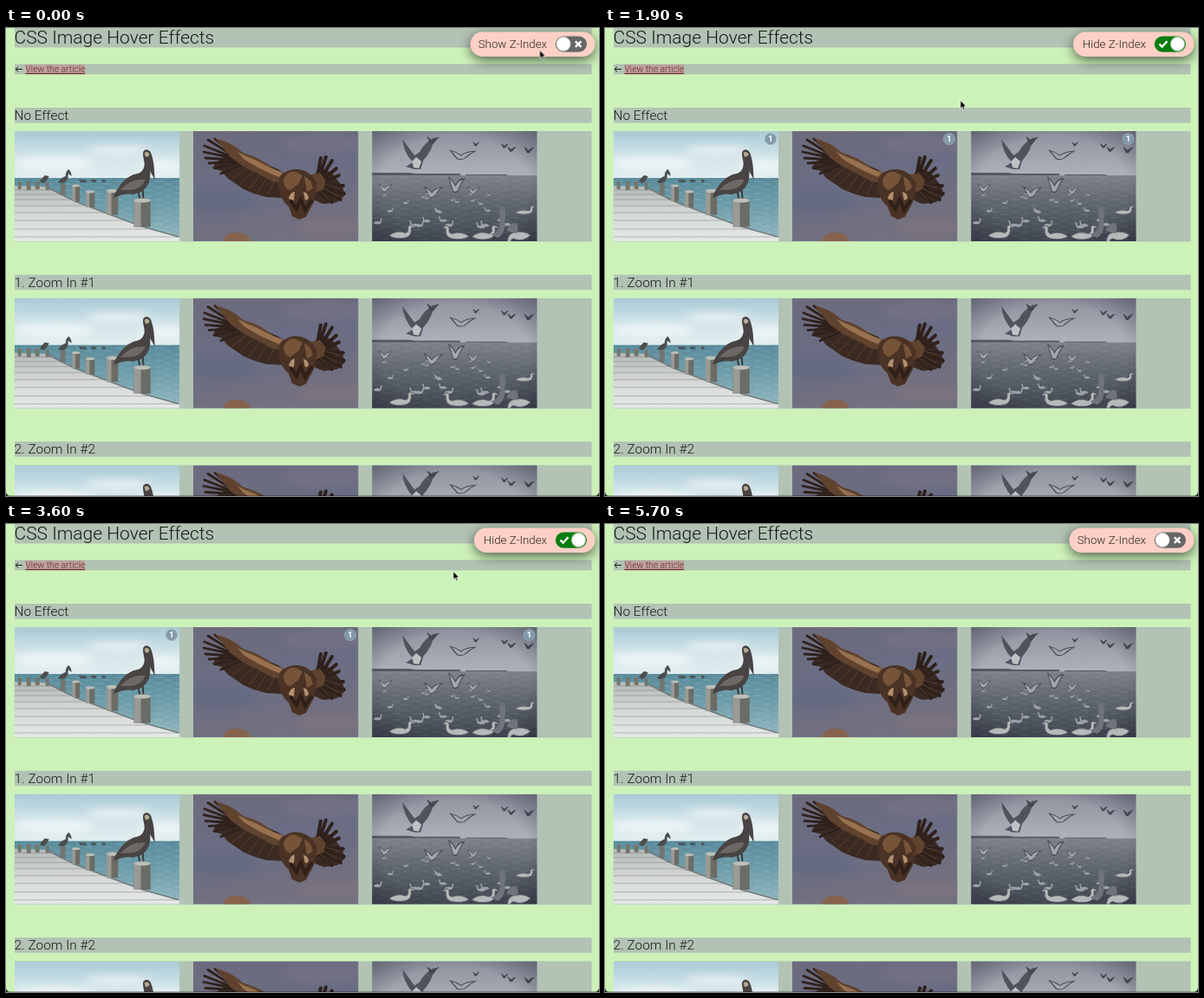
An HTML page that plays this animation: 684 by 540 pixels, repeating every 5.8 s.

```html
<!DOCTYPE html>
<html lang="en">
<head>
<meta charset="utf-8">
<title>CSS Image Hover Effects</title>
<style>
  html, body { margin: 0; width: 100%; height: 100%; overflow: hidden; background: #cdf2b9; }
  svg.stage { display: block; width: 684px; height: 540px; }
  text { font-family: Roboto, "Liberation Sans", Arial, sans-serif; font-weight: 300; fill: #161b17; }
  .title { font-size: 21px; }
  .head { font-size: 15.4px; }
  .small { font-size: 10.3px; }
  .label { font-size: 13.3px; text-anchor: end; fill: #2b2322; }
  .badge { font-size: 9.5px; font-weight: 700; text-anchor: middle; fill: #fff; }
  .panel { fill: #fdd0c5; filter: drop-shadow(0 4px 7px rgba(0, 0, 0, .6)); }

  .off, .on, .arrow, .hand, .cursor, .knob, .track, .tick, .cross { animation: 5800ms linear infinite; }
  .off { animation-name: off; animation-timing-function: step-end; }
  .on { animation-name: on; animation-timing-function: step-end; }
  .hand { animation-name: hand; animation-timing-function: step-end; }
  .arrow { animation-name: arrow; animation-timing-function: step-end; }
  .cursor { animation-name: travel; }
  .knob { animation-name: slide; }
  .track { animation-name: tint; }
  .tick { animation-name: tick; }
  .cross { animation-name: cross; }

  @keyframes off { 0%, 68.966% { opacity: 1 } 17.241% { opacity: 0 } 100% { opacity: 1 } }
  @keyframes on { 0%, 68.966% { opacity: 0 } 17.241% { opacity: 1 } 100% { opacity: 0 } }
  @keyframes hand { 0%, 23.3%, 77.5% { opacity: 0 } 11.2%, 65.5% { opacity: 1 } 100% { opacity: 0 } }
  @keyframes arrow { 0%, 23.3%, 77.5% { opacity: 1 } 11.2%, 65.5% { opacity: 0 } 100% { opacity: 1 } }
  @keyframes travel {
    0% { transform: translate(615.5px, 25.5px); animation-timing-function: ease-in-out }
    12.5%, 21% { transform: translate(640px, 23px); animation-timing-function: ease-in-out }
    32.759% { transform: translate(410px, 83.5px); animation-timing-function: ease-in-out }
    51.724%, 55% { transform: translate(274px, 119px); animation-timing-function: ease-in-out }
    67.241%, 75% { transform: translate(655.5px, 17.5px); animation-timing-function: ease-in }
    82.759%, 100% { transform: translate(700px, 44px) }
  }
  @keyframes slide {
    0%, 17.241%, 74.138%, 100% { transform: translate(643px, 18.5px) }
    22.414%, 68.966% { transform: translate(660.5px, 18.5px) }
  }
  @keyframes tint {
    0%, 17.241%, 74.138%, 100% { fill: #666 }
    22.414%, 70.69% { fill: #0b7d10 }
  }
  @keyframes tick { 0%, 17.241%, 74.138%, 100% { opacity: 0 } 22.414%, 68.966% { opacity: 1 } }
  @keyframes cross { 0%, 17.241%, 74.138%, 100% { opacity: 1 } 20%, 71% { opacity: 0 } }
</style>
</head>
<body>
<svg class="stage" viewBox="0 0 684 540">
  <defs>
    <linearGradient id="sky" x2="0" y2="1">
      <stop stop-color="#a9cad6"/><stop offset=".55" stop-color="#d3e5ea"/><stop offset="1" stop-color="#e2edef"/>
    </linearGradient>
    <linearGradient id="sea" x2="0" y2="1">
      <stop stop-color="#5a8c9b"/><stop offset=".5" stop-color="#719fac"/><stop offset="1" stop-color="#94bac1"/>
    </linearGradient>
    <linearGradient id="deck" x2="0" y2="1">
      <stop stop-color="#b4b8b6"/><stop offset=".5" stop-color="#d5d8d7"/><stop offset="1" stop-color="#e6e9e8"/>
    </linearGradient>
    <linearGradient id="hill" x2=".3" y2="1">
      <stop stop-color="#6d6b7d"/><stop offset=".5" stop-color="#6a6d84"/><stop offset="1" stop-color="#73707f"/>
    </linearGradient>
    <linearGradient id="dusk" x2="0" y2="1">
      <stop stop-color="#8f919e"/><stop offset="1" stop-color="#b0b2bb"/>
    </linearGradient>
    <linearGradient id="lake" x2="0" y2="1">
      <stop stop-color="#7d828c"/><stop offset=".4" stop-color="#626872"/><stop offset="1" stop-color="#40464f"/>
    </linearGradient>
    <radialGradient id="edge" r=".75">
      <stop offset=".6" stop-color="#222735" stop-opacity="0"/><stop offset="1" stop-color="#222735" stop-opacity=".5"/>
    </radialGradient>
    <filter id="soft" x="-30%" y="-60%" width="160%" height="220%"><feGaussianBlur stdDeviation="5"/></filter>
    <pattern id="ripple" width="23" height="7" patternUnits="userSpaceOnUse">
      <path d="M1 2h9M12 5h8" stroke="#fff" stroke-opacity=".2" stroke-width=".8"/>
    </pattern>
    <clipPath id="frame"><path d="M0 0h190.5v127H0z"/></clipPath>

    <g id="post">
      <path d="M-6 0h12v20h-12z" fill="#6b6c66"/>
      <path d="M-6 0h5v20h-5z" fill="#9a9b94"/>
      <ellipse rx="6" ry="1.6" fill="#bdbeb7"/>
    </g>
    <g id="pelican">
      <path d="M115 74C121 61 130 51 142 49Q149 47 150 39C150 33 147 27 149 23Q153 19 157 24Q160 31 161 41L162 56L157 47L154 34Q159 48 155 60Q150 71 137 73Q126 71 115 77z" fill="#474443"/>
      <path d="M122 68Q135 54 151 56Q147 67 132 68z" fill="#6c6964"/>
      <path d="M150 25q4-3 6 2q-3 4-5 2z" fill="#b8aa91"/>
      <path d="M143 70l2 10M148 68l1 12" stroke="#3c3937" stroke-width="2"/>
    </g>

    <g id="pier">
      <path d="M0 0h190.5v55H0z" fill="url(#sky)"/>
      <g fill="#f2f7f7" opacity=".8" filter="url(#soft)">
        <ellipse cx="45" cy="37" rx="48" ry="8"/><ellipse cx="120" cy="22" rx="38" ry="5"/>
        <ellipse cx="172" cy="40" rx="30" ry="7"/>
      </g>
      <path d="M0 54h190.5v73H0z" fill="url(#sea)"/>
      <path d="M0 54h190.5v73H0z" fill="url(#ripple)"/>
      <path d="M0 63L36 64L70 81L112 97L147 110L190.5 122V127H0z" fill="url(#deck)"/>
      <path d="M0 68h44M0 73h54M0 79h66M0 86h82M0 94h104M0 103h128M0 113h154M0 122h188" stroke="#80878a" stroke-width=".9" opacity=".6"/>
      <path d="M36 64L70 81L112 97L147 110L190 122" fill="none" stroke="#707a7b" stroke-width="1.6"/>
      <path d="M74 56h8l2 3h-8zM88 56h6l1 3h-6zM101 56h4v3h-4z" fill="#4b575b"/>
      <g fill="#717770"><path d="M4 58h4v9H4zM14 58h5v10h-5zM24 58h5v9h-5zM36 59h4v9h-4zM53 60h6v14h-6z"/></g>
      <path d="M50 59q5-6 9-7q0-6 4-8q3 4 3 8l-4-3q1 10-7 11zM29 58q3-4 6-7l5 1q-3 7-7 8z" fill="#4b4d4e"/>
      <use href="#post" transform="translate(71 63) scale(.75 .9)"/>
      <use href="#post" transform="translate(87.500 70) scale(.85 .9)"/>
      <use href="#post" transform="translate(113 69) scale(1.1 1.38)"/>
      <use href="#pelican"/>
      <use href="#post" transform="translate(147.500 80) scale(1.6 1.52)"/>
    </g>

    <g id="vulture">
      <path d="M0 0h190.5v127H0z" fill="url(#hill)"/>
      <g filter="url(#soft)" opacity=".35">
        <ellipse cx="150" cy="15" rx="50" ry="10" fill="#83798a"/>
        <ellipse cx="35" cy="82" rx="38" ry="12" fill="#566482"/>
        <ellipse cx="158" cy="111" rx="42" ry="10" fill="#8b7c80"/>
      </g>
      <path d="M34 127Q37 117 49 117Q63 117 66 127z" fill="#85634d"/>
      <path d="M44 24L26 36L22 43L33 46L39 54L48 60L58 67L70 72L84 76L101 77L112 70L100 45L66 30zM134 56L147 42L160 48L172 64L175 74L166 82L150 84L136 78z" fill="#3a2a22"/>
      <g fill="none" stroke="#2e211c" stroke-linecap="round" stroke-width="2.800">
        <path d="M48 28L25 9M47 29L17 10M46 30L13 17M46 31L12 24M48 33L14 31M51 35L18 37M54 36L25 43M58 38L32 49"/>
        <path stroke-width="4" d="M143 54L147 31M145 54L153 30M147 55L160 34M149 57L165 43M150 59L168 51M150 62L173 63M150 65L174 72M148 67L170 79M144 69L160 82"/>
        <path stroke="#59412f" stroke-width="1" d="M62 42L45 55M70 46L54 61M78 49L64 67M86 53L74 71M94 57L86 73M150 61L167 65M149 65L166 75M146 69L157 80"/>
      </g>
      <path d="M25 8Q45 13 57 25Q78 30 93 44L109 49L108 61L91 58Q74 48 58 41L43 30z" fill="#60432f"/>
      <path d="M51 24Q60 29 71 33Q88 42 103 48L99 53Q74 43 58 32z" fill="#98724f"/>
      <path d="M126 50Q138 51 146 48L153 57L150 67L134 74z" fill="#60432e"/>
      <path d="M99 55Q106 43 120 44Q136 45 143 62L139 82L130 99L122 102L114 98L110 87Q96 75 99 55z" fill="#4a3224"/>
      <path d="M104 56q5-11 14-9l8 4l-4 9l-10 8q-8-2-8-12zM128 52q9 4 10 14l-7 4z" fill="#765439"/>
      <path d="M110 78q2-8 7-8l-1 10zM127 70q6 1 6 8l-4 2z" fill="#b29070"/>
      <path d="M112 80l7 10l5-11l5 12l8-12" fill="none" stroke="#2d2019" stroke-width="4"/>
    </g>

    <path id="gull" d="M-10-7Q-5-5-1 0Q4-6 11-6Q7-3 3 3Q1 7-4 5Q-7-1-10-7z"/>
    <path id="swan" d="M-13 2Q-4-7 7-2Q11-3 10-9Q10-14 14-13Q18-12 17-9L14-10Q15 3 7 5Q-5 8-13 2z"/>
    <g id="birds">
      <path d="M0 0h190.5v53H0z" fill="url(#dusk)"/>
      <path d="M0 51h190.5v76H0z" fill="url(#lake)"/>
      <path d="M0 51h190.5v76H0z" fill="url(#ripple)" opacity=".55"/>
      <path d="M0 48h42l8 1h52v2H0zM108 50h48v1h-48z" fill="#555963"/>
      <path d="M0 0h190.5v127H0z" fill="url(#edge)"/>
      <path d="M35 9Q43 20 49 28L55 24Q60 14 72 7Q70 22 59 34L56 44L49 44L39 41L47 36Q36 24 35 9z" fill="#50535e"/>
      <path d="M46 35l5-5l6 5l-3 8l-6-1z" fill="#bfc1c4"/>
      <g fill="#42464f">
        <use href="#gull" transform="translate(70 11) scale(.7)"/>
        <use href="#gull" transform="translate(153 17) scale(.45)"/>
        <use href="#gull" transform="translate(161 21) scale(.5)"/>
        <use href="#gull" transform="translate(181 22) scale(.6)"/>
        <use href="#gull" transform="translate(120 15) scale(.4)"/>
      </g>
      <g fill="#a4a8ae" stroke="#4b505a" stroke-width="1.2">
        <use href="#gull" transform="translate(104 28) scale(1.35 .8)"/>
        <use href="#gull" transform="translate(97 63) scale(.85 1.35)"/>
        <use href="#gull" transform="translate(70 71) scale(.95)"/>
        <use href="#gull" transform="translate(117 69) scale(.65)"/>
        <use href="#gull" transform="translate(15 66) scale(.7)"/>
      </g>
      <g id="flock" fill="#9ca2a8"></g>
      <g fill="#b7b9b9" stroke="#50565e" stroke-width="1">
        <use href="#swan" transform="translate(32 119) scale(.95 .8)"/>
        <use href="#swan" transform="translate(99 120) scale(-1 .8)"/>
        <use href="#swan" transform="translate(128 120) scale(1 .85)"/>
        <use href="#swan" transform="translate(175 93) scale(.75 .5)"/>
        <use href="#swan" transform="translate(170 122) scale(-1)"/>
      </g>
      <path d="M137 119Q150 116 147 98Q146 86 151 87Q156 91 153 102Q155 118 145 123zM155 115q5-10 11-9q4 4 1 12z" fill="#6f747b"/>
    </g>

    <g id="row">
      <path d="M10 0H675.500V127.500H10z" fill="#b2c2b4"/>
      <g clip-path="url(#frame)" transform="translate(9.700 0)"><use href="#pier"/></g>
      <g clip-path="url(#frame)" transform="translate(216 0)"><use href="#vulture"/></g>
      <g clip-path="url(#frame)" transform="translate(422.200 0)"><use href="#birds"/></g>
    </g>
    <g id="badge">
      <circle r="6.600" fill="#8399aa" stroke="#a2b3bf" stroke-width=".6"/>
      <text class="badge" y="3.400">1</text>
    </g>
  </defs>

  <path d="M0 0h684v540H0z" fill="#cdf2b9"/>
  <path d="M10 0H675.500V22.500H10zM10 41.500H675.500V53.500H10zM10 92H675.500V109.500H10zM10 284.700H675.500V302.200H10zM10 477.300H675.500V494.800H10z" fill="#b2c2b4"/>
  <text class="title" x="9.500" y="18">CSS Image Hover Effects</text>
  <path d="M22.500 42H91v11.500H22.500z" fill="#b9a39c"/>
  <path d="M11 47.500h8M14 44.700l-3 2.800l3 2.800" fill="none" stroke="#1c211d"/>
  <text class="small" x="22.500" y="51" style="fill:#762524;text-decoration:underline">View the article</text>
  <text class="head" x="9.500" y="106">No Effect</text>
  <text class="head" x="9.500" y="298.700">1. Zoom In #1</text>
  <text class="head" x="9.500" y="491.300">2. Zoom In #2</text>
  <use href="#row" y="119"/>
  <use href="#row" y="311.700"/>
  <use href="#row" y="504.500"/>

  <g class="on">
    <use href="#badge" x="191" y="128"/>
    <use href="#badge" x="397" y="128"/>
    <use href="#badge" x="603.500" y="128"/>
    <rect class="panel" x="540" y="4.500" width="139.500" height="28.500" rx="14.200"/>
    <text class="label" x="624" y="23.300">Hide Z-Index</text>
  </g>
  <g class="off">
    <rect class="panel" x="535.500" y="4.500" width="144" height="28.500" rx="14.200"/>
    <text class="label" x="624" y="23.300">Show Z-Index</text>
  </g>
  <rect class="track" x="633.800" y="9.500" width="36.200" height="18.200" rx="9.100"/>
  <g fill="none" stroke="#fff" stroke-width="2.400">
    <path class="tick" d="M639.500 18.500l3 3.200l6-6.500"/>
    <path class="cross" d="M656.800 15.300l6.600 6.600m0-6.600l-6.600 6.600"/>
  </g>
  <circle class="knob" r="8.200" fill="#fff"/>

  <path d="M0 536q1 3 4 4H0zM684 536q-1 3-4 4h4z" fill="#101310"/>
  <path d="M3 539.500h678" stroke="#000" stroke-opacity=".25"/>

  <g class="cursor">
    <path class="arrow" d="M0 0V9.500L2.200 7.500L3.700 11L5.300 10.300L3.800 7H6.700z" fill="#000" stroke="#fff" stroke-width=".7"/>
    <path class="hand" d="M-1 1Q0-.8 1 1V5Q2.300 4 3 5.200Q4.300 4.400 4.800 5.800Q6.600 5.200 6.500 7.300Q6.500 10 5 12H-.3Q-2.500 9.500-3.600 7.200Q-3.300 5.500-1 7.300z" fill="#fff" stroke="#111" stroke-width=".9" stroke-linejoin="round"/>
  </g>
</svg>
<script>
  // Scatter small water birds with a fixed seed.
  let seed = 11;
  const rand = () => (seed = seed * 16807 % 2147483647) / 2147483647;
  const flock = document.getElementById("flock");
  for (let i = 0; i < 26; i++) {
    const depth = rand();
    const bird = document.createElementNS("http://www.w3.org/2000/svg", "use");
    const size = .16 + depth * .22;
    bird.setAttribute("href", "#swan");
    bird.setAttribute("transform",
      `translate(${6 + rand() * 150} ${72 + depth * 38}) scale(${rand() < .5 ? -size : size} ${size})`);
    flock.append(bird);
  }
</script>
</body>
</html>
```
